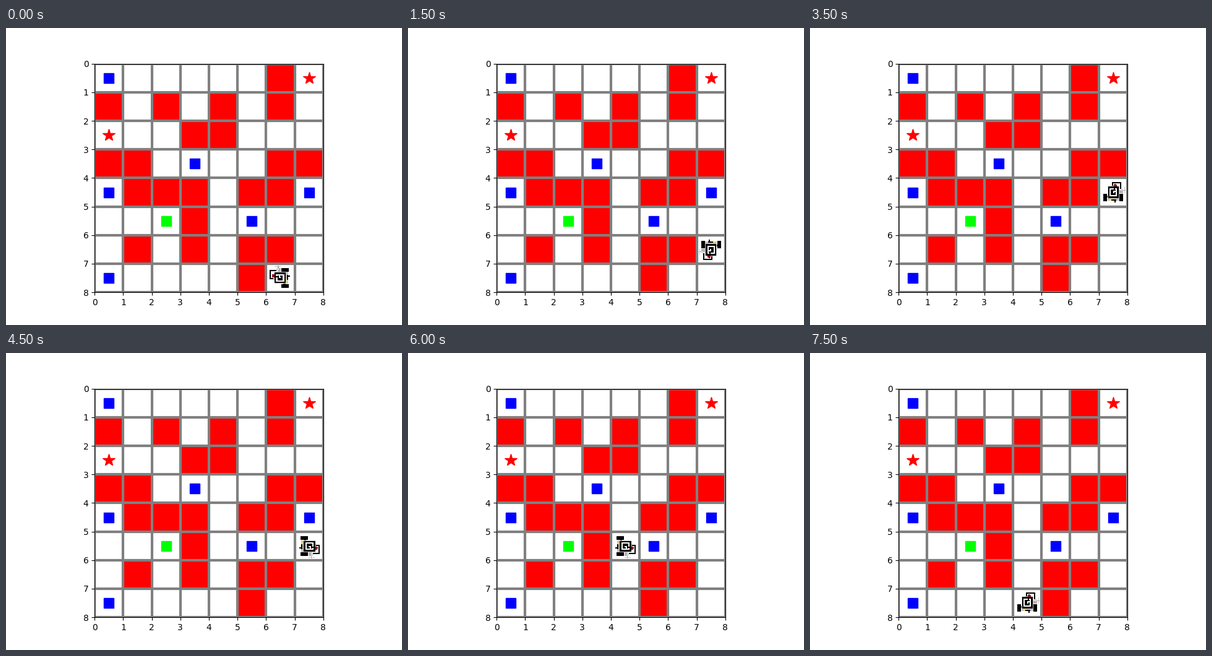
Animation of 640x480 px, one loop 8 s. Source, as a matplotlib script:

```python
import matplotlib.pyplot as plt
import numpy as np
from matplotlib.animation import FuncAnimation
from matplotlib.collections import PolyCollection

N = 8
CELL = 46.2  # pixels per grid cell
STEP_MS = 500

WALLS = ["......#.",
         "#.#.#.#.",
         "...##...",
         "##....##",
         ".###.##.",
         "...#....",
         ".#.#.##.",
         ".....#.."]
BLUE = [(0, 0), (3, 3), (0, 4), (7, 4), (5, 5), (0, 7)]
GREEN = [(2, 5)]
STARS = [(7, 0), (0, 2)]

# Robot facing down: x, y, width, height in pixels from its centre, colour
ROBOT = [
    (-2, -17, 15, 11, "black"), (0, -15, 11, 9, "white"),
    (-3, -11, 10, 3, "#c8c0c0"), (1, -13, 5, 3, "#a01020"),
    (2, -14, 2, 1, "black"),
    (10, -4, 6, 5, "#b4b4b4"), (12, -6, 4, 3, "#d8d8d8"),
    (16, -4, 4, 1, "#a0a0a0"), (18, -9, 1, 10, "#c8c8c8"),
    (-10, 5, 20, 3, "#404040"),
    (-16, 2, 6, 12, "black"), (10, 2, 6, 12, "black"),
    (-9, -10, 19, 23, "#c4c4c4"),
    (-7, 9, 6, 4, "#e0d080"), (-3, 11, 8, 2, "black"),
    (2, 13, 2, 3, "black"),
    (-8, -10, 17, 19, "black"),
    (-6, -7, 12, 13, "white"), (-4, -5, 8, 9, "black"),
    (0, -3, 2, 4, "white"), (2, -3, 2, 2, "white"),
    (1, -7, 2, 2, "black"),
]
HEADINGS = ["down", "right", "up", "left"]  # quarter turns on screen
MOVES = {"down": (0, 1), "right": (1, 0), "up": (0, -1), "left": (-1, 0)}
PLAN = ["go", "up", "go", "go", "go", "right", "down", "go",
        "left", "go", "go", "go", "down", "go", "go"]


def walk(x, y, heading):
    poses = [(x, y, heading)]
    for action in PLAN:
        if action == "go":
            dx, dy = MOVES[heading]
            x, y = x + dx, y + dy
        else:
            heading = action
        poses.append((x, y, heading))
    return poses


def robot_shapes(x, y, heading):
    pts = np.array([[(a, b), (a + w, b), (a + w, b + h), (a, b + h)]
                    for a, b, w, h, _ in ROBOT], float)
    for _ in range(HEADINGS.index(heading)):
        pts = np.stack([pts[..., 1], -pts[..., 0]], axis=-1)
    return pts / CELL + (x + 0.5, y + 0.5)


def put_marks(cells, style, size):
    xs, ys = np.array(cells).T + 0.5
    ax.plot(xs, ys, style[1], color=style[0], linestyle="", markersize=size)


fig, ax = plt.subplots(figsize=(6.4, 4.8), dpi=100)
board = np.ones((N, N, 3))
board[np.array([list(row) for row in WALLS]) == "#"] = (1, 0, 0)
ax.imshow(board, extent=(0, N, N, 0), interpolation="nearest")
ax.set_xticks(range(N + 1))
ax.set_yticks(range(N + 1))
ax.grid(color="gray", linestyle="-", linewidth=3)

put_marks(BLUE, ((0, 0, 1), "s"), 11)
put_marks(GREEN, ((0, 1, 0), "s"), 11)
put_marks(STARS, ((1, 0, 0), "*"), 15)

poses = walk(6, 7, "right")
robot = PolyCollection(robot_shapes(*poses[0]), zorder=3, linewidths=0,
                       facecolors=[part[-1] for part in ROBOT],
                       antialiaseds=False)
ax.add_collection(robot, autolim=False)


def update(i):
    robot.set_verts(robot_shapes(*poses[i]))
    return [robot]


anim = FuncAnimation(fig, update, frames=len(poses), interval=STEP_MS,
                     repeat=True, repeat_delay=0)
plt.show()
```
